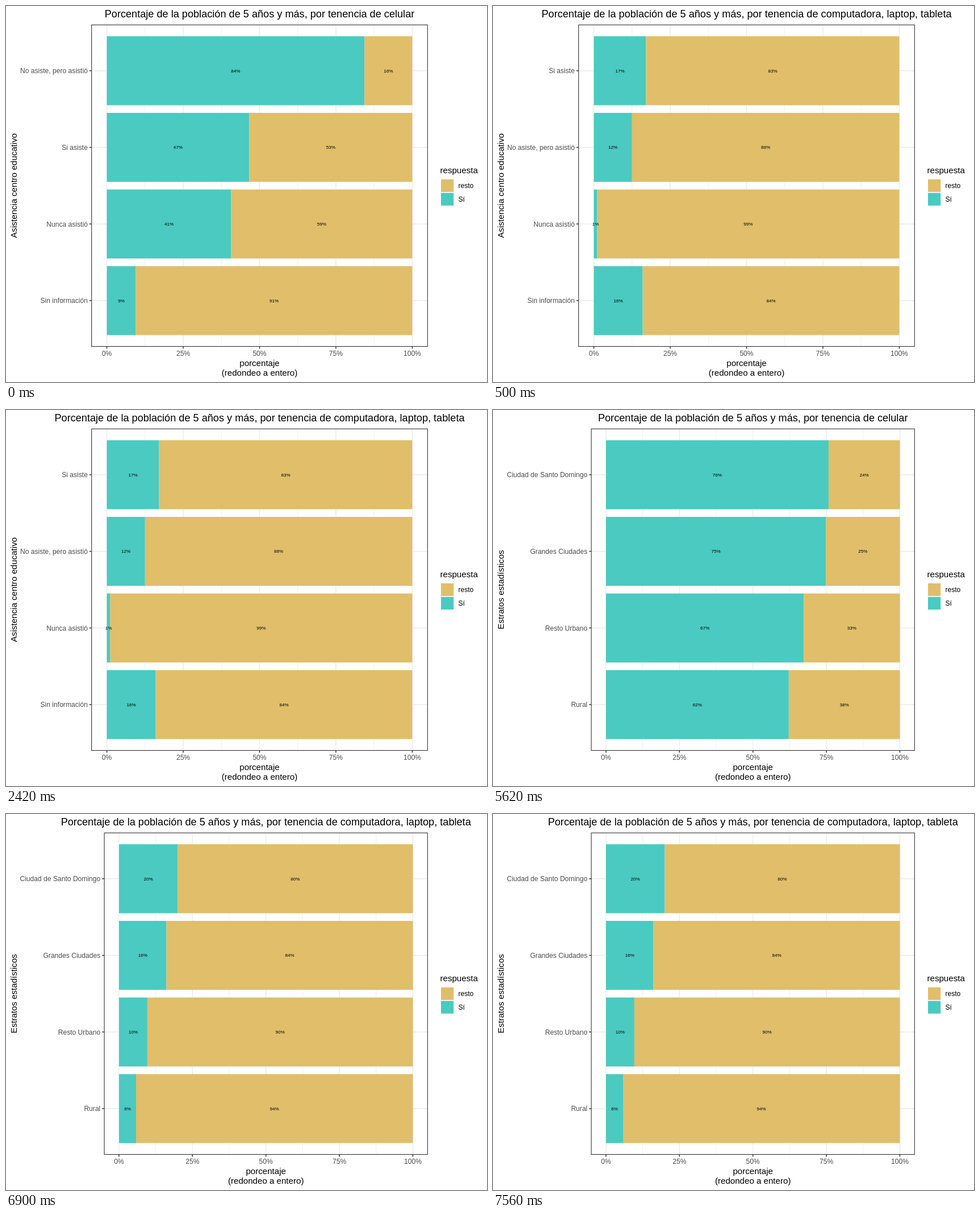
Recreate the animation shown at these times as an HTML page. Size 847 by 661 pixels, loop 8000 ms.

```html
<!DOCTYPE html>
<html lang="es">
<head>
<meta charset="utf-8">
<style>
html, body { margin: 0; width: 100%; height: 100%; overflow: hidden; background: #fff; }
svg { display: block; width: 847px; height: 661px; font: 15.1px "Liberation Sans", Arial, sans-serif; }
.title { font-size: 18.15px; }
.axis { font-size: 12.1px; fill: #4d4d4d; }
.key { font-size: 12.1px; }
.value { font-size: 8.1px; }
.mid { text-anchor: middle; }
.end { text-anchor: end; }
</style>
</head>
<body>
<svg id="chart" viewBox="0 0 847 661"></svg>
<script>
const TEAL = '#4acac0', GOLD = '#e0be6a', GRID = '#ebebeb', DARK = '#333';
const TOP = 33.2, BOTTOM = 598.5, RIGHT = 742.3, ROW = 134.7, BAR = 121.2;
const LOOP = 8000;

const school = { left: 150.7, name: 'Asistencia centro educativo' };
const strata = { left: 173.1, name: 'Estratos estadísticos' };
const places = ['Ciudad de Santo Domingo', 'Grandes Ciudades', 'Resto Urbano', 'Rural'];
const phone = 'celular', computer = 'computadora, laptop, tableta';

const scenes = [
  { start: 0, axis: school, item: phone, shares: [84.35, 46.6, 40.7, 9.48],
    rows: ['No asiste, pero asistió', 'Si asiste', 'Nunca asistió', 'Sin información'] },
  { start: 500, axis: school, item: computer, shares: [17.1, 12.49, 1.1, 16],
    rows: ['Si asiste', 'No asiste, pero asistió', 'Nunca asistió', 'Sin información'] },
  { start: 3700, axis: strata, item: phone, shares: [75.75, 74.85, 67.3, 62.2], rows: places },
  { start: 6900, axis: strata, item: computer, shares: [20, 16.15, 9.65, 5.8], rows: places }
];

const text = (x, y, s, cls = '', extra = '') => `<text x="${x}" y="${y}" class="${cls}" ${extra}>${s}</text>`;
const rect = (x, y, w, h, fill, extra = '') =>
  `<rect x="${x}" y="${y}" width="${w}" height="${h}" fill="${fill}" ${extra}/>`;
const line = (x1, y1, x2, y2, color, width) =>
  `<path d="M${x1} ${y1}L${x2} ${y2}" stroke="${color}" stroke-width="${width}"/>`;

function render({ axis, item, shares, rows }) {
  const { left, name } = axis;
  const width = RIGHT - left, center = left + width / 2;
  const px = p => left + width * (5 + p) / 110;
  const rowY = i => 113.8 + i * ROW;
  let grid = '', bars = '', labels = '';

  for (let p = 0; p <= 100; p += 12.5) {
    const x = px(p), major = p % 25 === 0;
    grid += line(x, TOP, x, BOTTOM, GRID, major ? 1.45 : 0.75);
    if (major) {
      labels += line(x, BOTTOM, x, BOTTOM + 3.9, DARK, 1.45) + text(x, 614.8, p + '%', 'axis mid');
    }
  }
  rows.forEach((row, i) => {
    const y = rowY(i), share = shares[i];
    const segment = (from, to, color) => {
      bars += rect(px(from), y - BAR / 2, px(to) - px(from), BAR, color);
      labels += text(px((from + to) / 2), y + 2.9, Math.round(to - from) + '%', 'value mid');
    };
    grid += line(left, y, RIGHT, y, GRID, 1.45);
    segment(0, share, TEAL);
    segment(share, 100, GOLD);
    labels += line(left - 3.9, y, left, y, DARK, 1.45) + text(left - 6.8, y + 4.35, row, 'axis end');
  });

  return grid + bars +
    rect(left, TOP, width, BOTTOM - TOP, 'none', `stroke="${DARK}" stroke-width="1.1"`) + labels +
    text(center, 20.3, `Porcentaje de la población de 5 años y más, por tenencia de ${item}`, 'title mid') +
    text(center, 633.4, 'porcentaje', 'mid') +
    text(center, 650, '(redondeo a entero)', 'mid') +
    text(0, 0, name, 'mid', 'transform="translate(18.7 315.8) rotate(-90)"') +
    text(764.5, 294, 'respuesta') +
    rect(766, 304.7, 22.2, 22.2, GOLD) + text(796.4, 320.1, 'resto', 'key') +
    rect(766, 328.6, 22.2, 22.2, TEAL) + text(796.4, 343.8, 'Sí', 'key');
}

const chart = document.getElementById('chart');
let shown;
function tick() {
  const t = performance.now() % LOOP;
  const scene = scenes.findLast(s => t >= s.start);
  if (scene !== shown) {
    chart.innerHTML = render(scene);
    shown = scene;
  }
  requestAnimationFrame(tick);
}
tick();
</script>
</body>
</html>
```
